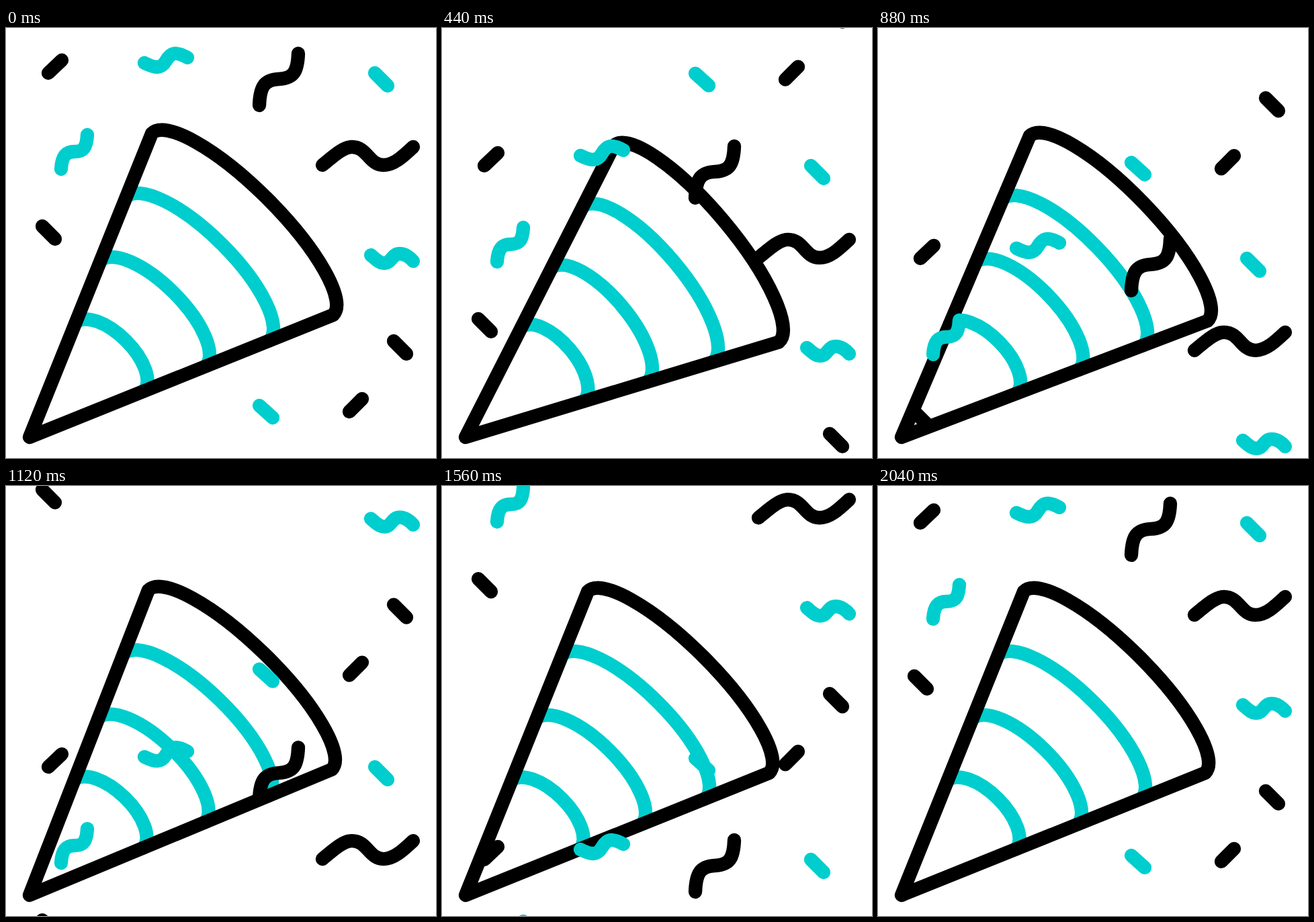
An HTML page for the animation above (2080 ms loop, 640 by 640 pixels).

```html
<!DOCTYPE html>
<html lang="en">
<head>
<meta charset="utf-8">
<title>Party popper</title>
<style>
  html, body { margin: 0; width: 100%; height: 100%; overflow: hidden; background: #fff; }
  svg { display: block; width: 100%; height: 100%; }
  path { fill: none; stroke: #000; stroke-width: 20.3; stroke-linecap: round; stroke-linejoin: round; }
  .teal { stroke: #00cece; }
</style>
</head>
<body>
<svg viewBox="0 0 640 640">
  <defs>
    <g id="confetti">
      <path d="M83 48L63 67M54 295L73 314M577 466L596 485M530 552L511 571"/>
      <path d="M435 38C434 65 428 75 406 76S378 88 377 115"/>
      <path d="M471 204C488 190 502 177 515 177C538 177 540 204 562 204C577 204 590 192 606 177"/>
      <path class="teal" d="M549 67L568 86M377 562L397 580"/>
      <path class="teal" d="M206 52C222 60 231 61 238 49S252 34 270 44"/>
      <path class="teal" d="M121 159C120 177 116 184 102 184S83 192 82 210"/>
      <path class="teal" d="M543 338C548 342 555 350 563 350C574 350 574 336 586 336C594 336 602 342 606 347"/>
    </g>
  </defs>
  <g id="cone"></g>
  <use id="leaving" href="#confetti"/>
  <use id="arriving" href="#confetti"/>
</svg>
<script>
const LOOP = 2080, STEP = 40;
const TIP = { x: 35, y: 609 };
const byId = id => document.getElementById(id);
const cone = byId('cone'), leaving = byId('leaving'), arriving = byId('arriving');

// Half ellipse across the cone; reach is the share of the cone's length.
function arc(reach, depth) {
  const near = 182 * reach, far = 452 * reach;
  const half = (far - near) / Math.SQRT2;
  return `M${TIP.x + near} ${TIP.y - far}` +
    `A${half} ${depth} 45 0 1 ${TIP.x + far} ${TIP.y - near}`;
}

const stripes = [[0.79, 51.4], [0.58, 43.8], [0.376, 34.5]]
  .map(([reach, depth]) => `<path class="teal" stroke-linecap="butt" d="${arc(reach, depth)}"/>`);
cone.innerHTML = stripes.join('') + `<path d="${arc(1, 53)}L${TIP.x} ${TIP.y}Z"/>`;

// Linear swing out and back, each key followed by a decaying wobble.
const PEAK = 11, OUT = 0.28, BACK = 0.52;
function wobble(speed, s) {
  return s < 1 ? 0.055 * speed * Math.sin(4 * Math.PI * s) * Math.exp(-2.2 * s) : 0;
}
function swing(s) {
  const rise = PEAK / OUT, fall = -PEAK / (BACK - OUT);
  if (s < OUT) return rise * s;
  if (s < BACK) return PEAK + fall * (s - OUT) + wobble(rise, s - OUT);
  return wobble(fall, s - BACK);
}

function draw(ms) {
  const p = ms / LOOP;
  cone.setAttribute('transform', `rotate(${swing(ms / 1000)} ${TIP.x} ${TIP.y})`);
  leaving.setAttribute('transform', `translate(0 ${652 * p})`);
  arriving.setAttribute('transform', `translate(0 ${627 * (p - 1)})`);
}

const start = performance.now();
function tick() {
  const ms = (performance.now() - start) % LOOP;
  draw(Math.floor(ms / STEP) * STEP);
  requestAnimationFrame(tick);
}
tick();
</script>
</body>
</html>
```
